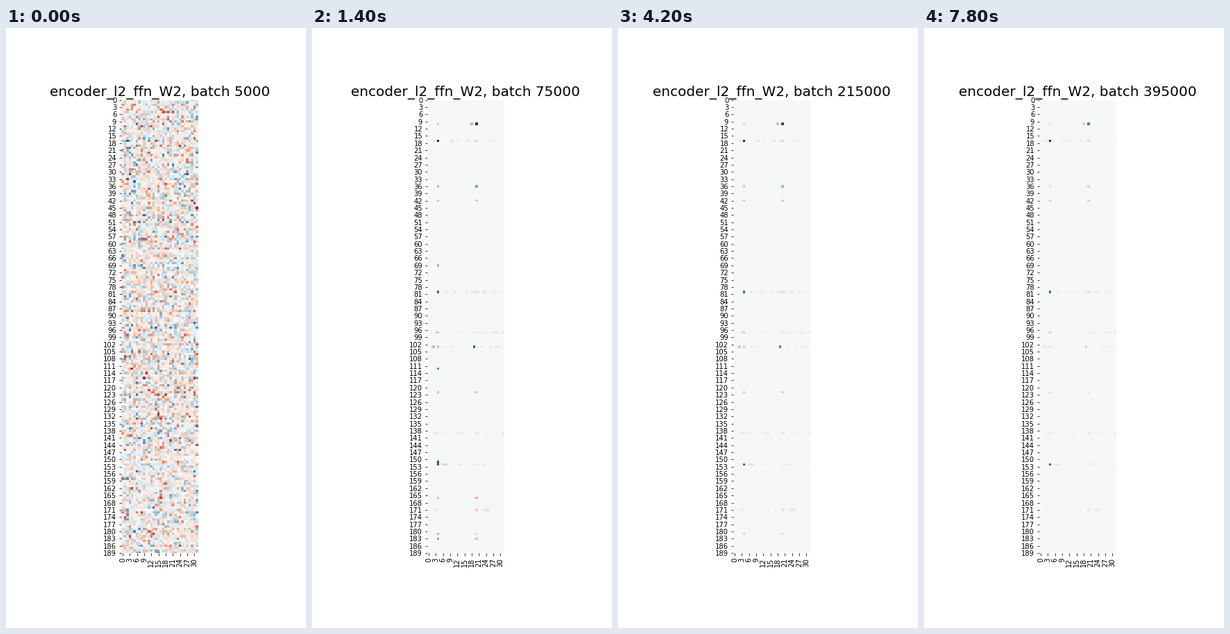
These frames come from a looping animation (432x864 px, 8 s). A matplotlib script:

```python
import numpy as np
import matplotlib.pyplot as plt
from matplotlib.animation import FuncAnimation

ROWS, COLS = 190, 32
FRAMES, INTERVAL = 40, 200
SETTLED = 7  # step at which the noise has gone
MAIN = (4, 20)  # the two columns that carry most weight

# row, weight in each main column, steps it lives on once settled
KEY_ROWS = (
    (10, -.25, 1, 60), (17, 1, -.25, 500), (36, -.38, .5, 45),
    (42, -.33, -.3, 150), (69, -.4, 0, 7), (80, .75, .18, 400),
    (97, -.33, .1, 120), (103, -.35, 0, 40), (112, .6, 0, 7),
    (122, .36, -.3, 50), (139, .12, -.18, 150), (151, .85, 0, 13),
    (152, .82, -.1, 250), (166, .35, -.38, 9), (181, -.4, .2, 25),
    (183, .5, -.35, 13),
)
SIDE = ((10, 18, -.4, 60), (103, 19, .8, 36), (103, 2, .38, 40))
PALE_ROWS = (17, 80, 97, 103, 139, 152, 171)
SPIKES = ((17, 4), (68, 19), (103, 19), (111, 4))  # early peaks

plt.rcParams.update({"font.family": "DejaVu Sans", "font.size": 10})

rng = np.random.default_rng(12)
noise = rng.normal(-.01, .25, (ROWS, COLS)) * rng.uniform(.8, 1.15, (ROWS, 1))
keep = .15 + .5 * rng.random((ROWS, 1)) ** 1.5
gain = np.ones(COLS)
gain[list(MAIN)] = 1.9
gain[[5, 18, 19]] = 1.25

pale = np.zeros((ROWS, COLS))
for r in PALE_ROWS:
    pale[r] = rng.normal(-.04, .11, COLS) * (rng.random(COLS) < .45)

CELLS = SIDE + tuple((r, c, v, life) for r, *pair, life in KEY_ROWS
                     for c, v in zip(MAIN, pair))


def settled(step):
    """Sparse weights left when the noise has gone."""
    t = max(step - SETTLED, 0)
    w = pale * (1 - t / 80)
    for r, c, v, life in CELLS:
        w[r, c] = v * np.sqrt(max(1 - t / life, 0))
    return w


def weights(step):
    if step == 0:
        return noise
    if step >= SETTLED:
        return settled(step)
    fade = (SETTLED - step) / (SETTLED - 1)
    w = noise * gain * keep ** (.5 + .5 * step) * np.exp(-(step - 1) / 2)
    w += (1 - fade) * settled(step)
    for cell in SPIKES:
        w[cell] = max(w[cell], fade)
    return w


fig, ax = plt.subplots(figsize=(6, 12), dpi=72, facecolor="white")
fig.subplots_adjust(left=.125, right=.9, bottom=.125, top=.88)
mesh = ax.pcolormesh(np.arange(COLS + 1), np.arange(ROWS + 1), weights(0),
                     cmap="RdBu", vmin=-1, vmax=1, linewidth=0)
ax.set_aspect("equal")
ax.set_xlim(0, COLS)
ax.set_ylim(ROWS - .5, .5)
ax.spines[:].set_visible(False)

xs, ys = np.arange(0, COLS, 3), np.arange(0, ROWS, 3)
ax.set_xticks(xs + .5, xs, rotation=90)
ax.set_yticks(ys + .5, ys)
title = ax.set_title("", fontsize=20)


def draw(step):
    mesh.set_array(weights(step))
    title.set_text(f"encoder_l2_ffn_W2, batch {5000 + 10000 * step}")
    return mesh, title


anim = FuncAnimation(fig, draw, frames=FRAMES, interval=INTERVAL,
                     repeat=True, repeat_delay=0)
plt.show()
```
